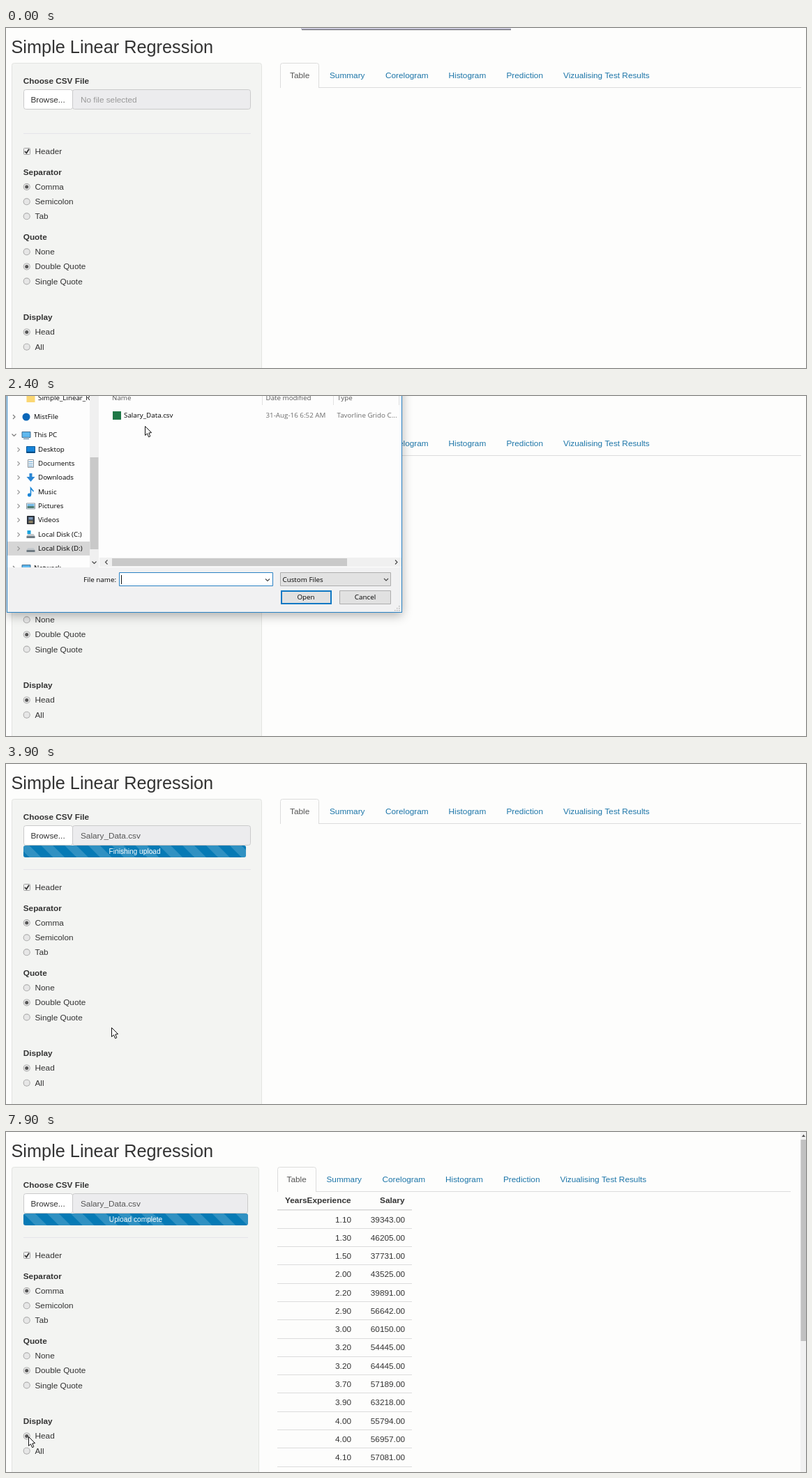
Animation of 1147x488 px, one loop 8 s. Source, as an HTML page with a canvas:

```html
<!DOCTYPE html>
<html lang="en">
<head>
<meta charset="utf-8">
<title>Simple Linear Regression</title>
<style>
html, body { margin: 0; width: 100%; height: 100%; overflow: hidden; background: #fdfdfc; }
canvas { display: block; }
</style>
</head>
<body>
<canvas id="stage" width="1147" height="488"></canvas>
<script>
const W = 1147, H = 488, LOOP = 8000;
const screen2d = document.getElementById('stage').getContext('2d');
const layer = Object.assign(document.createElement('canvas'), { width: W, height: H });
const layer2d = layer.getContext('2d');
let c = screen2d;

const PAGE = '"Liberation Sans", Arial, sans-serif';
const UI = '"Open Sans", "Noto Sans", sans-serif';
const LINK = '#1c75a8', PAPER = '#fdfdfc';

// ---- drawing helpers ----
function text(s, x, y, color = '#333', font = '11.8px ' + PAGE, align = 'left') {
  c.font = font;
  c.fillStyle = color;
  c.textAlign = align;
  c.fillText(s, x, Math.round(y));
}
const bold = (s, x, y, align) => text(s, x, y, '#333', 'bold 11.8px ' + PAGE, align);
const ui = (s, x, y, color = '#000', align) => text(s, x, y + 3.3, color, '9.8px ' + UI, align);

function rect(x, y, w, h, fill) {
  c.fillStyle = fill;
  c.fillRect(x, y, w, h);
}
function box(x, y, w, h, fill, stroke, radius = 0, width = 1) {
  c.beginPath();
  c.roundRect(x + width / 2, y + width / 2, w - width, h - width, radius);
  c.fillStyle = fill;
  c.fill();
  c.strokeStyle = stroke;
  c.lineWidth = width;
  c.stroke();
}
function line(points, color, width = 1) {
  c.beginPath();
  points.forEach(([x, y]) => c.lineTo(x, y));
  c.strokeStyle = color;
  c.lineWidth = width;
  c.stroke();
}
function poly(points, fill, stroke) {
  c.beginPath();
  points.forEach(([x, y]) => c.lineTo(x, y));
  c.closePath();
  c.fillStyle = fill;
  c.fill();
  if (stroke) {
    c.strokeStyle = stroke;
    c.lineWidth = 1;
    c.stroke();
  }
}
function disc(x, y, r, fill) {
  c.beginPath();
  c.arc(x, y, r, 0, 7);
  c.fillStyle = fill;
  c.fill();
}
function chevron(x, y, turn, color = '#444', size = 3) {
  c.save();
  c.translate(x, y);
  c.rotate(turn * Math.PI / 2);
  line([[-size / 2, -size], [size / 2, 0], [-size / 2, size]], color, 1.1);
  c.restore();
}

// ---- page ----
function radio(label, y, on) {
  disc(29.7, y, 5, '#a2a2a2');
  disc(29.7, y, 4.1, '#e6e6e6');
  if (on) disc(29.7, y, 2.5, '#555');
  text(label, 41.5, y + 4);
}

function progress(t, width) {
  const start = 3400, done = t >= 4200;
  if (t < start) return;
  const u = Math.min(1, (t - start) / 600);
  const w = width * (1 - Math.pow(1 - u, 2.2) * (1 + u) / (1 + u * u));
  const step = 33.8;
  const shift = done ? 0 : step * (1 - (t - start) % 2000 / 2000);
  c.save();
  c.beginPath();
  c.roundRect(25, 117, w, 17, 3);
  c.clip();
  rect(25, 117, w, 17, '#067ab5');
  for (let x = 25 + shift - 3 * step; x < 25 + w; x += step)
    poly([[x, 117], [x + step / 2, 117], [x + step / 2 + 17, 134], [x + 17, 134]], 'rgba(255,255,255,.17)');
  text(done ? 'Upload complete' : 'Finishing upload', 25 + w / 2, 129, '#fff', '10.2px ' + PAGE, 'center');
  c.restore();
}

const TABS = [['Table', 407], ['Summary', 464], ['Corelogram', 544], ['Histogram', 634.5],
  ['Prediction', 717.5], ['Vizualising Test Results', 799]];
const ROWS = [[1.1, 39343], [1.3, 46205], [1.5, 37731], [2, 43525], [2.2, 39891], [2.9, 56642],
  [3, 60150], [3.2, 54445], [3.2, 64445], [3.7, 57189], [3.9, 63218], [4, 55794], [4, 56957], [4.1, 57081]];

function table(x, count) {
  bold('YearsExperience', x + 105.5, 102.4, 'right');
  bold('Salary', x + 182.5, 102.4, 'right');
  rect(x, 111, 193, 1.5, '#d8d8d8');
  ROWS.slice(0, count).forEach((row, i) => {
    const y = 125.5 + i * 26.28;
    row.forEach((v, k) => text(v.toFixed(2), x + (k ? 183 : 106), y + 4, '#333', undefined, 'right'));
    if (i < count - 1 || count > 6) rect(x, Math.round(y + 12.4), 193, 1, '#dcdcdc');
  });
}

function page(t) {
  const all = t >= 5900, dx = all ? -4.5 : 0, right = all ? 347 : 351;
  rect(0, 0, W, H, PAPER);
  if (t < 1000) {
    rect(423, 0, 301, 2, '#c9c8da');
    rect(424, 2, 300, 1, '#5a5a62');
  }
  text('Simple Linear Regression', 7.5, 36, '#333', '25.3px ' + PAGE);

  box(8, 50, right + 8, 460, '#f3f4f2', '#e3e4e1', 3);
  bold('Choose CSV File', 24.7, 80);
  box(95, 88, right - 95, 29, '#ececee', '#cacaca', 3);
  const hover = t >= 1500 && t < 2200;
  box(25, 88, 71, 29, hover ? '#e4e4ea' : '#fff', hover ? '#adadb8' : '#cacaca', 3);
  text('Browse...', 35.5, 107);
  const chosen = t >= 3000;
  text(chosen ? 'Salary_Data.csv' : 'No file selected', 107, 107, chosen ? '#555' : '#999');
  progress(t, right - 25);
  rect(25, 151, right - 25, 1, '#e4e4ea');

  box(25, 172, 10, 10, '#f0f0f0', '#a0a0a0', 1);
  line([[27, 177], [29.3, 179.5], [33, 173.8]], '#333', 1.8);
  text('Header', 41.5, 181.4);
  const head = t < 5800 || t >= 7850;
  bold('Separator', 24.7, 211);
  radio('Comma', 228, true);
  radio('Semicolon', 249.3, false);
  radio('Tab', 270.3, false);
  bold('Quote', 24.7, 304);
  radio('None', 321.3, false);
  radio('Double Quote', 342.4, true);
  radio('Single Quote', 363.5, false);
  bold('Display', 24.7, 419.3);
  radio('Head', 436.4, head);
  radio('All', 457.7, !head);

  const left = Math.round(393 + dx);
  rect(left, 85, (all ? 1125 : 1140) - left, 1, '#dcdcdc');
  box(left, 50, 56, 45, PAPER, '#dcdcdc', 3);
  rect(left - 1, 86, 60, 12, PAPER);
  rect(left, 85, 1, 1, '#dcdcdc');
  TABS.forEach(([name, x], i) => text(name, x + dx, 72, i ? LINK : '#555'));
  if (t >= 4200) table(left, all ? 14 : 6);

  if (all) {
    rect(1139, 0, 8, H, '#f1f1f1');
    rect(1139.5, 11, 7.5, 289, '#c1c1c1');
    poly([[1141, 7], [1146, 7], [1143.5, 3.5]], '#555');
  }
}

// ---- file dialog ----
const ICONS = {
  star: (x, y) => poly(Array.from({ length: 10 }, (_, i) => {
    const a = i * Math.PI / 5 - Math.PI / 2, r = i % 2 ? 2.6 : 6;
    return [x + r * Math.cos(a), y + r * Math.sin(a)];
  }), '#3f9be0'),
  blank: (x, y) => box(x - 4.5, y - 6, 9, 12, '#fff', '#8a949c'),
  folder(x, y) {
    rect(x - 6, y - 6, 6, 3, '#e8b84a');
    rect(x - 6, y - 4, 12, 10, '#fbd773');
  },
  dot: (x, y) => disc(x, y, 5.5, '#0a66b8'),
  pc(x, y) {
    box(x - 6.5, y - 5, 13, 9, '#5fb8ee', '#3e6f94');
    rect(x - 4, y + 5, 8, 1, '#3e6f94');
  },
  desktop(x, y) {
    box(x - 6.5, y - 5, 13, 10, '#1583d8', '#0b5796');
    rect(x - 6, y + 3, 12, 1, '#073d6b');
  },
  page(x, y) {
    ICONS.blank(x, y);
    [-3, 0, 3].forEach(d => rect(x - 3, y + d, 6, 1, '#4a90c4'));
  },
  down(x, y) {
    rect(x - 2, y - 6, 4, 6, '#2a86d4');
    poly([[x - 6, y - 1], [x + 6, y - 1], [x, y + 6]], '#2a86d4');
  },
  note(x, y) {
    disc(x - 2, y + 4, 2.6, '#1c86d6');
    line([[x, y + 4], [x, y - 6], [x + 4, y - 1]], '#1c86d6', 1.6);
  },
  photo(x, y) {
    box(x - 6.5, y - 4.5, 13, 9, '#fff', '#8c9aa4');
    rect(x - 5, y - 3, 10, 3, '#79bdea');
    rect(x - 5, y, 10, 3, '#4f7d74');
  },
  film(x, y) {
    box(x - 5.5, y - 6, 11, 12, '#39414d', '#20242b');
    rect(x - 3, y - 4, 6, 3.5, '#7c98b8');
    rect(x - 3, y + 1, 6, 3.5, '#8a7f62');
  },
  disk(x, y) {
    poly([[x - 4, y - 1], [x + 4, y - 1], [x + 6, y + 2], [x - 6, y + 2]], '#c3c8cc');
    rect(x - 6, y + 2, 12, 3, '#6f7a82');
  },
  system(x, y) {
    ICONS.disk(x, y);
    rect(x - 5, y - 6, 5, 5, '#19a3dd');
  }
};
// label, icon, indent, y in the unscrolled list
const QUICK = [['Quick access', 'star', 38, 17], ['Documents', 'folder', 46, 37], ['Downloads', 'folder', 46, 57],
  ['Pictures', 'folder', 46, 77], ['1. Torvanel Limit', 'folder', 46, 97], ['Desktop', 'folder', 46, 118],
  ['Personal', 'folder', 46, 138], ['Simple_Linear_R', 'folder', 46, 159], ['MistFile', 'dot', 40, 186],
  ['This PC', 'pc', 40, 212.5]];
const DRIVES = [['Desktop', 'desktop'], ['Documents', 'page'], ['Downloads', 'down'], ['Music', 'note'],
  ['Pictures', 'photo'], ['Videos', 'film'], ['Local Disk (C:)', 'system'], ['Local Disk (D:)', 'disk']]
  .map(([name, icon], i) => [name, icon, 46, 233.3 + i * 20.3]);

function nav(open) {
  const scroll = open ? 156.5 : 0;
  const items = [...QUICK, ...(open ? DRIVES : []), ['Network', 'pc', 40, open ? 403 : 239]];
  c.save();
  c.beginPath();
  c.rect(2, 0, 118, 246);
  c.clip();
  rect(2, (open ? 375.4 : 212.5) - scroll - 10, 118, 20, '#d6d6d6');
  for (const [name, icon, x, y0] of items) {
    const y = Math.round(y0 - scroll);
    // folder pictures arrive after the list has loaded
    ICONS[icon === 'folder' && !open ? 'blank' : icon](x - (x > 40 ? 10.5 : 11), y);
    ui(name, x, y);
    if (x < 46) chevron(11.5, y, name === 'This PC' && open ? 1 : 0, '#777');
    else if (y0 > 220) chevron(18, y, 0, '#999');
    else if (y0 < 80) line([[110, y + 2], [115, y - 3]], '#999', 2);
  }
  c.restore();
  rect(120, 0, 13, 246, '#f0f0f0');
  rect(120.5, open ? 88 : 0, 12, open ? 132 : 222, '#c9c9c9');
  chevron(126.5, 239, 1);
}

function fileList(t, picked) {
  ['Name', 'Date modified', 'Type'].forEach((s, i) => ui(s, [152, 372.5, 475][i], 3, '#555'));
  [367, 469, 563].forEach(x => rect(x, 0, 1, 13, '#e2e2e2'));
  if (t >= 2500) rect(147, 18, 418, 20, picked ? '#cce8ff' : '#e5f3ff');
  rect(153, 22, 12, 12, '#1e7846');
  ui('Salary_Data.csv', 169, 28);
  ui('31-Aug-16 6:52 AM', 372.5, 28, '#6d6d6d');
  ui('Tavorline Grido C...', 474.5, 28, '#6d6d6d');
  chevron(144, 238.5, 2);
  chevron(559.5, 238.5, 0);
}

function controls(picked) {
  ui('File name:', 158, 263.5, '#000', 'right');
  box(162, 253, 221, 20, '#fff', '#2a82c4');
  if (picked) ui('Salary_Data.csv', 165.5, 263.5);
  else rect(165, 257, 1, 13, '#111');
  chevron(375, 264, 1);
  box(393, 253, 159, 20, '#e2e2e2', '#adadad');
  ui('Custom Files', 396.5, 263.5);
  chevron(545, 263.5, 1);
  box(394, 279, 73, 20, '#e1e1e1', '#0f78c4', 0, 2);
  ui('Open', 430, 288.8, '#000', 'center');
  box(478, 279, 74, 20, '#e1e1e1', '#adadad');
  ui('Cancel', 515, 288.8, '#000', 'center');
  for (let i = 0; i < 3; i++)
    for (let k = 0; k <= i; k++) rect(563 - 3 * k, 301 + 3 * i, 1.5, 1.5, '#bbb');
}

function dialog(t) {
  const ready = t >= 2100, picked = t >= 2800;
  c.clearRect(0, 0, W, H);
  c.save();
  c.shadowColor = 'rgba(0,0,0,.3)';
  c.shadowBlur = 14;
  c.shadowOffsetY = 4;
  rect(1, -20, 567, 331, '#fdfdfd');
  c.restore();
  rect(2, 246, 565, 64, '#f1f1f2');
  rect(134, 232, 433, 13, '#f0f0f0');
  rect(152, 233, 337, 11, '#c9c9c9');
  nav(ready);
  if (ready) {
    fileList(t, picked);
    controls(picked);
  }
  rect(1, 0, 1, 311, '#2a82c4');
  rect(567, 0, 1, 311, '#2a82c4');
  rect(1, 310, 567, 1, '#2a82c4');
}

function showDialog(t) {
  if (t < 1900 || t >= 3100) return;
  const [alpha, scale] = t < 2000 ? [.15, .96] : t < 2100 ? [.85, .993] : t < 3000 ? [1, 1] : [.5, .977];
  c = layer2d;
  dialog(t);
  c = screen2d;
  c.save();
  c.globalAlpha = alpha;
  c.translate(284, 90);
  c.scale(scale, scale);
  c.drawImage(layer, -284, -90);
  c.restore();
}

// ---- pointer: time, x, y ----
const PATH = [[400, 600, 2], [900, 380, 60], [1500, 80, 106], [2000, 80, 106], [2400, 199, 43],
  [2700, 204, 29], [3100, 204, 29], [3800, 151, 378], [4600, 151, 378], [5400, 36, 466],
  [5700, 34, 459], [7300, 34, 459], [7700, 32, 437]];

function pointer(t) {
  if (t < PATH[0][0]) return;
  const n = PATH.findIndex(p => p[0] > t);
  const b = PATH.at(n), a = n > 0 ? PATH[n - 1] : b;
  const u = n > 0 ? (t - a[0]) / (b[0] - a[0]) : 0, e = u * u * (3 - 2 * u);
  c.save();
  c.translate(a[1] + (b[1] - a[1]) * e, a[2] + (b[2] - a[2]) * e);
  if (t >= 1500 && t <= 2000) {
    poly([[-1.5, 0], [1, 0], [1, 6], [4, 6], [7, 7], [10, 9], [10, 13], [8, 19], [0, 19],
      [-4, 12], [-4, 9.5], [-1.5, 11]], '#fff', '#111');
    line([[3.5, 7], [3.5, 10]], '#111');
    line([[6.5, 8], [6.5, 11]], '#111');
  } else if (t >= 3000 && t <= 3100) {
    line([[0, -6], [0, 6]], '#222');
    line([[-3, -6.5], [3, -6.5]], '#222');
    line([[-3, 6.5], [3, 6.5]], '#222');
  } else {
    poly([[.5, .5], [.5, 13.5], [3.5, 10.8], [5.6, 15.8], [7.8, 14.8], [5.8, 10], [9.6, 9.6]], '#fff', '#111');
  }
  c.restore();
}

function frame(now) {
  const t = Math.floor(now % LOOP / 100) * 100;
  page(t);
  showDialog(t);
  pointer(t);
  requestAnimationFrame(frame);
}
requestAnimationFrame(frame);
</script>
</body>
</html>
```
